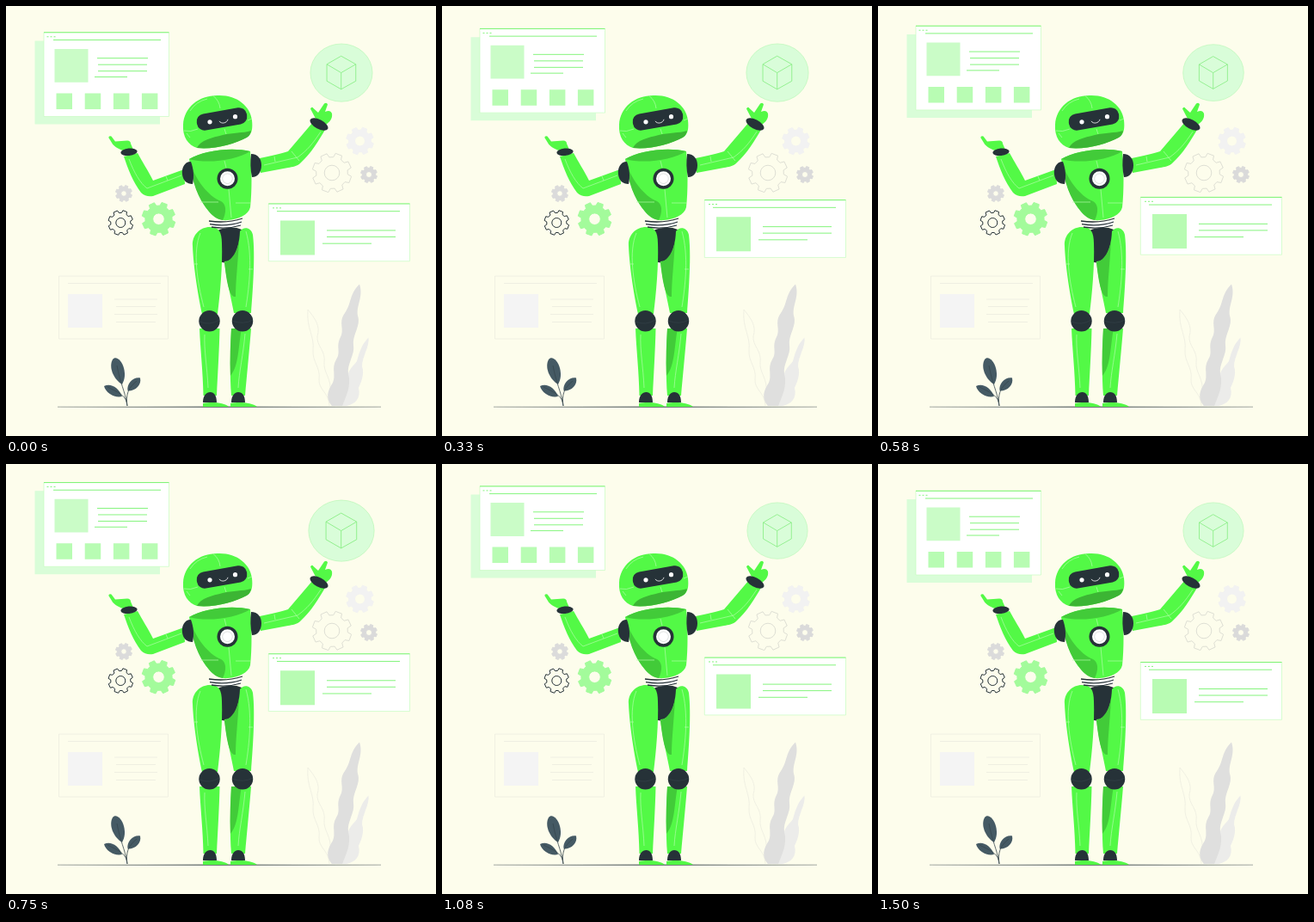
Animation, 500 px wide and 500 px high, one loop 1540 ms. Source, as an HTML page:

```html
<!DOCTYPE html>
<html lang="en">
<head>
<meta charset="utf-8">
<title>Robot with floating panels</title>
<style>
  html, body { margin: 0; width: 100%; height: 100%; overflow: hidden; background: #fdfdec; }
  svg { display: block; width: 100vw; height: 100vh; }
  .g { fill: #53f946; }
  .s { fill: #42cb39; }
  .d { fill: #263238; }
  .ln { fill: none; stroke: #66f25c; stroke-width: .8; }
  .hi { fill: none; stroke: #b0fca8; stroke-width: .7; }
  .gl { fill: none; stroke: #ecece0; stroke-width: .8; }
</style>
</head>
<body>
<svg viewBox="0 0 500 500">
  <!-- faint panel -->
  <g class="gl">
    <path d="M61.5 314H188.5V387H61.5ZM72 322.5H180M126 341H176M128 349.5H174M126 358.5H176M128 367.5H174"/>
    <path d="M72 335H112V374H72Z" fill="#f4f4f4" stroke="none"/>
  </g>

  <!-- floating panels -->
  <g class="float">
    <path d="M33.5 41H179V138H33.5Z" fill="#d9fdd8"/>
    <path d="M44 31.3H189.5V129H44Z" fill="#fff" stroke="#c6fcc1" stroke-width=".7"/>
    <path class="ln" d="M44 31.3H189.5M55 40H180M106 61.2H165M107 68.7H164M107 76.2H164M103 83H141"/>
    <path class="ln" d="M47.5 36.3h2m2 0h2m2 0h2" stroke-width="1.8"/>
    <path d="M56.5 50.5H95.5V89.3H56.5Z" fill="#cafcc7"/>
    <path d="M58.5 102h18.5v18.5h-18.5zm33.2 0h18.5v18.5h-18.5zm33.2 0h18.5v18.5h-18.5zm33 0h18.5v18.5h-18.5z" fill="#b8fcb3"/>
  </g>
  <g class="float">
    <path d="M305.3 230.5H469.5V297.3H305.3Z" fill="#fff" stroke="#c6fcc1" stroke-width=".7"/>
    <path class="ln" d="M305.3 230.5H469.5M315 239.2H458M373 261.5H453M373 269H453M368 276.7H425"/>
    <path class="ln" d="M310 235.4h2m2 0h2m2 0h2" stroke-width="1.8"/>
    <path d="M319 250H359V290H319Z" fill="#b8fbb3"/>
  </g>

  <!-- pulsing cube -->
  <g id="cube">
    <ellipse cx="390" cy="77.6" rx="35.1" ry="32.7" fill="#d9fdd9" stroke="#bdf8ba" stroke-width=".7"/>
    <path d="M389.7 58.7L406.3 68V87L389.7 96.3L373.5 87V68ZM373.5 68L389.7 77.6L406.3 68M389.7 77.6V96.3" fill="none" stroke="#86ee82" stroke-width=".8" stroke-linejoin="round"/>
  </g>

  <g id="gears"></g>

  <!-- plants -->
  <path d="M351 353C349 375 359 384 357 400C356 414 366 420 364 434C363 446 376 450 376 465M351 353C359 363 366 372 362 384C361 396 372 400 370 415C369 426 379 434 377 449L379 465" class="gl"/>
  <path d="M421.5 385.5C423 396 414 408 414 419C417 428 413 437 410 444C413 456 406 463 396 465H388C392 452 401 445 398 434C396 424 403 420 408 413C411 402 414 393 421.5 385.5Z" fill="#ececea"/>
  <path d="M411 323.5C416 338 407 348 409 360C413 372 403 381 404 394C406 406 396 416 398 428C402 441 395 455 391 465H379C371 456 374 447 380 438C384 429 378 421 384 411C390 402 383 396 389 385C394 375 386 368 394 357C402 346 399 335 411 323.5Z" fill="#dfdfde"/>
  <g fill="#455a64">
    <path d="M135 440C125 434 119 420 124 411C128 406 135 413 137 421C139 429 138 434 135 440Z"/>
    <path d="M135 454C126 456 116 450 114 442C121 438 131 443 135 454Z"/>
    <path d="M141.5 447.5C140 439 148 431 156 432.5C158 441 150 448 141.5 447.5Z"/>
  </g>
  <path d="M129 418C133 440 138 446 141 465M118 443C130 449 138 452 140.5 461M152 436C142 444 139 452 141 465" fill="none" stroke="#37474f" stroke-width=".8"/>
  <path d="M60 466.2L248 465.7L436 466.2L248 466.7Z" fill="#3d484d" stroke="#7d8484" stroke-width=".4"/>

  <!-- legs -->
  <path class="d" d="M246 261C254 257 266 256 274 260C275 276 272 290 264 296C258 299 252 299 248 297Z"/>
  <path class="g" d="M272 262C276 256 285 257 287 266C290 290 287 330 285 357H265C262 340 256 318 254 297C264 297 271 285 272 262Z"/>
  <path class="s" d="M254 298C263 296 269 285 271 272C270 295 267 320 267 338C259 340 256 315 254 298Z"/>
  <path class="g" d="M217 279C216 266 226 257 237 257C247 257 251 262 251 276C252 300 249 335 246 358H228C224 340 218 305 217 279Z"/>
  <path class="g" d="M225 375H248.5C248 400 246 430 245 453H229.5C229 425 226 400 225 375Z"/>
  <path class="g" d="M262 375H285C283 400 280 430 278 453H262C260 430 261 400 262 375Z"/>
  <path class="s" d="M262 375H274C270 395 271 418 261 430C260 410 261 392 262 375Z"/>
  <path class="d" d="M229 461C229 453 233 449 237.5 449C242 449 245 453 245 461ZM262 461C262 453 266 449 270 449C275 449 278 453 278 461Z"/>
  <path class="g" d="M229 466V462C239 460 254 461 259 466ZM261 466V462C271 460 286 461 292 466Z"/>
  <circle class="d" cx="236.5" cy="366.3" r="12.2"/>
  <circle class="d" cx="275" cy="366.3" r="12.2"/>
  <path d="M225 367Q237 372 248 365M263 366Q276 371 287 365" fill="none" stroke="#36444b" stroke-width=".6"/>
  <path class="hi" d="M226 264C217 285 222 320 230 350M279 262C287 290 283 325 279 350M231 382C230 400 234 420 235 444M278 381C276 405 271 425 270 444M219 300H223M282 306H287"/>

  <!-- waist -->
  <path d="M237 251Q257 254 274 248L273 256Q256 260 240 257Z" fill="#fff"/>
  <path d="M236 250Q257 253 275 247M237 253.7Q257 257 274 251M239 257Q257 260 273 255" fill="none" stroke="#263238" stroke-width="1.3"/>

  <!-- arms -->
  <path class="g" d="M207 190L171 203C166 193 158 180 153 171L137 175C142 190 148 205 157 217C161 221 166 222 171 221L208 207Z"/>
  <path class="g" d="M136 168C130 166 125 163 123 159L119.3 153Q119.5 150.5 122.5 151.5L127 157.5L141 156.5Q145 156.5 145 160L148 167Z"/>
  <ellipse class="d" cx="143" cy="169.8" rx="9.7" ry="4.2" transform="rotate(-6 143 169.8)"/>
  <path class="g" d="M295 177C308 174 320 172 328 169L357 135L372 142C363 158 354 172 343 182C338 187 333 187 328 188L296 194Z"/>
  <path class="g" d="M360 131L354 119.5Q355.5 116.5 357.5 119L363 124L370 113.5Q373 111.5 374 114.5L371 123Q377 120 379 125C380 131 376 135 372 138Z"/>
  <ellipse class="d" cx="364" cy="137.5" rx="11.5" ry="5.4" transform="rotate(28 364 137.5)"/>
  <path class="hi" d="M143 178C149 194 156 206 164 212L204 197M366 146C357 160 350 168 339 176L300 185M332 169L341 180M186 198L188 203M312 175L313 181"/>

  <!-- torso -->
  <path class="g" d="M213 178C230 168 262 164 284 169C286 190 286 215 284 234C282 243 270 248 258 249C249 250 242 245 237 240C224 226 217 205 213 178Z"/>
  <path class="s" d="M213.5 181C221 203 235 221 250 227C257 231 256 241 252 249C245 248 240 244 236 239C222 222 217 205 213.5 181Z"/>
  <path class="s" d="M213 178C230 168 262 164 284 169C268 179 235 184 213 178Z"/>
  <path class="hi" d="M254 180L256 188M259 213L262 246M226 228H247M267 229H284"/>
  <path class="d" d="M215 181C207 181 204 189 205 196C206 203 210 207 217 207C219 198 218 189 215 181ZM285 172C293 172 297 178 297 185C297 193 293 199 286 199C284 190 284 181 285 172Z"/>
  <circle class="d" cx="257.5" cy="200.7" r="12"/>
  <circle cx="257.5" cy="200.7" r="8.5" fill="#fff"/>
  <circle cx="257.5" cy="200.7" r="5.8" fill="none" stroke="#cfd3d2" stroke-width=".7"/>

  <!-- head -->
  <path class="g" d="M222 165C212 162 205 152 206 138C207 118 224 104 246 104C268 103 284 116 286 133C287 142 286 149 281 152C265 161 242 167 222 165Z"/>
  <path d="M222 165C226 156 240 153 252 150C264 147 275 148 285 145C284 149 283 151 280 153C265 161 242 167 222 165Z" fill="#3cb534"/>
  <path class="hi" d="M241 104.500Q248 110 249 119M254 143L256 149M207 145Q214 147 223 143M281 133L286 131M214 122Q221 111 234 108M210 148L214 153"/>
  <rect class="d" x="221.5" y="121.7" width="59" height="19.4" rx="9" transform="rotate(-10 251 131.4)"/>
  <circle cx="237" cy="134.8" r="2.6" fill="#fff"/>
  <circle cx="266.5" cy="128.7" r="2.6" fill="#fff"/>
  <path d="M248 133.8C250 137.5 257 136.500 258 131.800" fill="none" stroke="#fff" stroke-width=".8"/>
</svg>
<script>
  const LOOP = 1540, FRAMES = 37;
  const cube = document.getElementById('cube');
  const floats = document.querySelectorAll('.float');

  // [cx, cy, outer radius, hole radius, fill, stroke]
  const gears = [
    [137, 218, 9.6, 3.3, '#dbdbdb'],
    [177.5, 247.7, 19.6, 6.8, '#a3fb9b'],
    [133.3, 252, 14.5, 5.5, 'none', '#263238'],
    [411.5, 157, 16, 6, '#f2f2f2'],
    [379, 194, 23, 8.8, 'none', '#dedfd4'],
    [422, 196, 9.6, 3.5, '#dadada']
  ];

  function gearPath(cx, cy, r, hole) {
    const teeth = 8, pts = [];
    for (let i = 0; i < teeth; i++) {
      for (const [k, da] of [[.8, -.26], [1, -.17], [1, .17], [.8, .26]]) {
        const a = (i + .45) / teeth * 2 * Math.PI + da;
        pts.push((cx + r * k * Math.cos(a)).toFixed(2) + ' ' + (cy + r * k * Math.sin(a)).toFixed(2));
      }
    }
    return `M${pts.join('L')}ZM${cx - hole} ${cy}a${hole} ${hole} 0 1 0 ${2 * hole} 0a${hole} ${hole} 0 1 0 ${-2 * hole} 0Z`;
  }

  document.getElementById('gears').innerHTML = gears.map(([x, y, r, h, fill, stroke]) =>
    `<path d="${gearPath(x, y, r, h)}" fill="${fill}" stroke="${stroke || fill}" stroke-linejoin="round" fill-rule="evenodd"/>`
  ).join('');

  // Linear interpolation through [position, value] steps
  function track(steps, p) {
    const i = Math.max(1, steps.findIndex(s => s[0] >= p));
    const [a, u] = steps[i - 1], [b, v] = steps[i];
    return u + (v - u) * (p - a) / (b - a);
  }
  const rise = [[0, 0], [.5, -10], [1, 0]];
  const beat = [[0, 1], [.1, 1.1], [.3, 1], [.4, 1], [.5, 1.1], [.6, 1], [1, 1]];

  function draw(now) {
    const step = Math.floor(((now + 4) % LOOP) / LOOP * FRAMES);
    const p = (step + 1) / FRAMES;
    const y = track(rise, p), k = track(beat, p);
    floats.forEach(f => f.setAttribute('transform', `translate(0 ${y})`));
    cube.setAttribute('transform', `translate(390 77.6) scale(${k}) translate(-390 -77.6)`);
  }

  const start = performance.now();
  function tick() {
    draw(performance.now() - start);
    requestAnimationFrame(tick);
  }
  tick();
</script>
</body>
</html>
```
